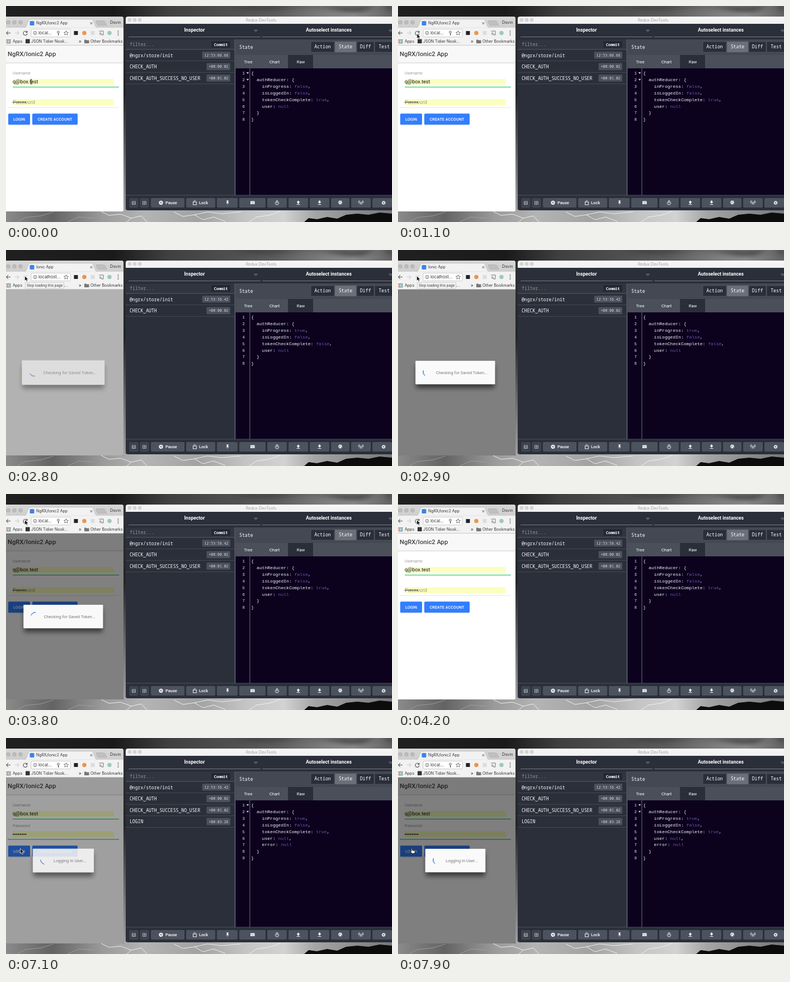
An HTML page for the animation above (8 s loop, 690 by 388 pixels).

```html
<!DOCTYPE html>
<html lang="en">
<head>
<meta charset="utf-8">
<title>Login state demo</title>
<style>
html,body{margin:0;width:100%;height:100%;overflow:hidden;background:#333}
svg{display:block;width:100vw;height:100vh}
text{white-space:pre}
.ui{font-family:Inter,"Open Sans",sans-serif}
.md{font-family:Roboto,sans-serif}
.mono{font-family:"Noto Sans Mono","DejaVu Sans Mono",monospace}
.code{font-family:"Liberation Mono","Courier New",monospace}
</style>
</head>
<body>
<svg id="stage" viewBox="0 0 690 388" preserveAspectRatio="none"></svg>
<script>
const LOOP = 8000;
const stage = document.getElementById('stage');

const rect = (x, y, w, h, fill, more = '') =>
  `<rect x="${x}" y="${y}" width="${w}" height="${h}" fill="${fill}" ${more}/>`;
const dot = (x, y, r, fill, more = '') => `<circle cx="${x}" cy="${y}" r="${r}" fill="${fill}" ${more}/>`;
const line = (d, stroke, w = 1, more = '') =>
  `<path d="${d}" fill="none" stroke="${stroke}" stroke-width="${w}" ${more}/>`;
const area = (d, fill, more = '') => `<path d="${d}" fill="${fill}" ${more}/>`;
const text = (x, y, s, size, fill, font = 'ui', more = '') =>
  `<text x="${x}" y="${y}" font-size="${size}" fill="${fill}" class="${font}" ${more}>${s}</text>`;
const group = (id, body, more = '') => `<g id="${id}" ${more}>${body}</g>`;
const grad = (id, stops, dir = '') =>
  `<linearGradient id="${id}" ${dir}>` + stops.map(([o, c]) =>
    `<stop offset="${o}" stop-color="${c}"/>`).join('') + '</linearGradient>';
const mid = 'text-anchor="middle"', end = 'text-anchor="end"';
const bold = 'font-weight="600"', medium = 'font-weight="500"';

function backdrop() {
  return '<defs>' +
    grad('sky', [[0, '#202020'], [.28, '#1a1a1a'], [.42, '#404040'], [.55, '#4c4c4c'],
      [.7, '#5c5c5c'], [.82, '#7c7c7c'], [.9, '#8c8c8c'], [1, '#626262']]) +
    grad('ground', [[0, '#8a8a8a'], [.12, '#636363'], [.25, '#9a9a9a'], [.36, '#b4b4b4'],
      [.5, '#a2a2a2'], [.62, '#c4c4c4'], [.72, '#d2d2d2'], [.8, '#a5a5a5'], [1, '#777']]) +
    grad('gap', [[0, '#333'], [.4, '#252525'], [.75, '#777'], [1, '#aaa']], 'x2="0" y2="1"') +
    grad('bar', [[0, '#d6d6d6'], [1, '#cfcfcf']], 'x2="0" y2="1"') +
    grad('pale', [[0, '#f8f8f8'], [1, '#efefef']], 'x2="0" y2="1"') +
    '<filter id="blur" x="-30%" y="-60%" width="160%" height="240%"><feGaussianBlur stdDeviation="4"/></filter>' +
    '</defs>' +
    rect(0, 0, 690, 388, 'url(#gap)') + rect(0, 0, 690, 20, 'url(#sky)') + rect(0, 366, 690, 22, 'url(#ground)') +
    area('M400 0Q450 9 500 4T590 7T650 5T690 9V0Z', '#2a2a2a', 'opacity=".7" filter="url(#blur)"') +
    line('M170 369L184 376L205 374L224 381L242 377L252 388M224 381L216 388M300 370L316 378L337 375L352 384L371 379L392 387M337 375L360 370L386 373L420 370M434 388L448 379L470 376L490 369', '#f4f4f4', .9) +
    line('M20 388L34 380L62 377L85 370M110 388L130 379L158 381', '#aaa', .7) +
    area('M533 388L541 381L556 383L574 379L592 382L608 375L628 373L648 375L668 371L690 373V388Z', '#0c0c0c');
}

function chrome() {
  let s = area('M0 19H206Q210 19 210 23V366Q210 369 207 369H0Z', '#fff') +
    area('M0 19H206Q210 19 210 23V39H0Z', 'url(#bar)') +
    rect(0, 39, 210, 31.5, '#f2f2f2') + rect(0, 70, 210, .8, '#bbb') +
    area('M33 39Q36 38 37 35L40 27Q41 24 44 24H152Q155 24 156 27L159 35Q160 38 163 39Z', '#f2f2f2', 'stroke="#b4b4b4" stroke-width=".5"') +
    rect(34, 38.5, 128, 1.2, '#f2f2f2') +
    area('M161 26.5H174Q176 26.5 177 28L180 35H166Q164 35 163 33Z', '#c0bfc0', 'stroke="#a8a8a8" stroke-width=".5"') +
    [4, 15, 26].map(x => dot(x, 29.5, 3.3, '#bdbdbd', 'stroke="#a0a0a0" stroke-width=".6"')).join('') +
    line('M150.5 29L154.5 33M154.5 29L150.5 33', '#555', .9) +
    text(186, 31.8, 'Dovin', 7.2, '#333');
  s += line('M8 48.5H1M4 45L.8 48.5L4 52', '#555', 1.1) + line('M16 48.5H23M20 45L23 48.5L20 52', '#ccc', 1.1) +
    rect(45, 41.5, 70, 14, '#fff', 'rx="2" stroke="#bbb" stroke-width=".7"') +
    dot(52, 48.5, 3, 'none', 'stroke="#555" stroke-width=".8"') + rect(51.6, 48, .9, 2.2, '#555') + rect(51.6, 46.6, .9, .8, '#555') +
    area('M107.5 44.4L108.6 47.2L111.6 47.4L109.3 49.3L110.1 52.2L107.5 50.6L104.9 52.2L105.7 49.3L103.4 47.4L106.4 47.2Z', 'none', 'stroke="#555" stroke-width=".8"') +
    rect(121.5, 45, 7, 7, '#222') + dot(140, 48.5, 3.8, '#ef9446') + rect(151.5, 45, 7, 7, '#dcdcdc') +
    line('M167 46V45H174V52H171M167 48Q171 48 171 52M167 50Q169 50 169 52', '#666', .9) +
    dot(185, 48.5, 3.7, '#9fc9b1') + [45, 48.5, 52].map(y => dot(200.5, y, .9, '#555')).join('');
  const hues = ['#d9534f', '#e0a33a', '#4a9b57', '#4a7fd0'];
  for (let i = 0; i < 9; i++) s += rect(1 + i % 3 * 2.7, 60 + (i / 3 | 0) * 2.7, 2, 2, hues[(i * 3 + (i / 3 | 0)) % 4]);
  return s + text(12, 66, 'Apps', 7, '#333') + rect(35, 59.5, 7.5, 7.5, '#333') +
    text(45, 66, 'JSON Tidier Nook...', 7, '#333') + text(130, 66, '»', 8, '#333') +
    area('M140 60.5H143L144 61.5H148.5V67H140Z', '#777') + text(151, 66, 'Other Bookmarks', 7, '#333') +
    group('favicon', rect(42.5, 27, 8, 8, '#3f83e8', 'rx="1.5"')) +
    group('tabSpin', line('M0 -3A3 3 0 0 0 -2 2.2', '#3878d8', 1.2)) +
    group('titleApp', text(54, 33.3, 'NgRX/Ionic2 App', 6.9, '#333')) +
    group('titleNew', text(54, 33.3, 'Ionic App', 6.9, '#333')) +
    group('urlShort', text(58, 51.3, 'local...', 7.7, '#333') +
      dot(93.5, 46.8, 1.8, 'none', 'stroke="#555"') + line('M93.5 48.5V53M93.5 51.5H95', '#555')) +
    group('urlLong', text(58, 51.3, 'localhost...', 7.7, '#333')) +
    group('reload', line('M37.2 46.6A3.6 3.6 0 1 0 38 49.4', '#555', 1.1) + area('M38.4 44.2V48H34.8Z', '#555')) +
    group('stop', line('M31 45.5L37 51.5M37 45.5L31 51.5', '#555', 1.1)) +
    group('tip', rect(34.5, 58.5, 69, 10.5, '#f4f4f4', 'stroke="#bbb" stroke-width=".6"') + text(37, 66, 'Stop loading this page', 6.1, '#333'));
}

const masked = (x, y, gap, r) => Array.from({length: 8}, (_, i) => dot(x + i * gap, y, r, '#222')).join('');

function form() {
  const button = (x, w, s) => rect(x, 194.5, w, 20, '#000', 'rx="1.5" opacity=".13"') +
    rect(x, 193.3, w, 19.7, '#327eff', 'rx="1.5"') + text(x + w / 2, 206, s, 7.3, '#fff', 'md', mid + ' ' + medium);
  return rect(0, 71, 210, 31, '#f8f8f8') + rect(0, 101.5, 210, 1, '#cfcfcf') + rect(0, 102.5, 210, 1, '#ededed') +
    text(3, 90, 'NgRX/Ionic2 App', 11.2, '#424242', 'md', medium) +
    text(12, 123, 'Username', 7, '#999', 'md') +
    rect(12, 131, 181, 10, '#faffbd') + text(12, 139.3, 'q@box.test', 9, '#111', 'md') +
    rect(12, 145, 190, 1.2, '#32c864') + rect(12, 167.5, 181, 10.5, '#faffbd') +
    group('idle', text(12, 176, 'Password', 9, '#999', 'md') + masked(13, 172.8, 3.1, .95) + rect(4, 182, 198, .7, '#ddd')) +
    group('filled', text(12, 159.5, 'Password', 7, '#999', 'md') + masked(13.2, 173, 3.15, 1.15) + rect(3, 181.5, 199, 1.2, '#32c864')) +
    button(4, 39, 'LOGIN') + button(47, 81, 'CREATE ACCOUNT');
}

const dialog = (id, x, w, label) => group(id,
  rect(x + 1, 207, w - 2, 41, '#000', 'opacity=".55" filter="url(#blur)"') +
  rect(x, 199, w, 42.3, '#fafafa', 'rx="1"') +
  `<g class="arc">${area('M-4.9 -5A7 7 0 0 0 -4.9 5Q-8 0 -4.9 -5Z', '#4a86e8', 'stroke="#4a86e8" stroke-width=".8"')}</g>` +
  text(x + 36.6, 223, label, 7.5, '#777', 'md'));

function devtools() {
  const title = (x, s) => text(x, 46.4, s, 8.7, '#fff', 'md', mid + ' ' + bold);
  let s = area('M214 23Q214 19 218 19H690V367H218Q214 367 214 364Z', '#2a2f3a') +
    area('M214 32V23Q214 19 218 19H690V32Z', 'url(#pale)') +
    [221, 230, 239].map(x => dot(x, 25, 3, '#d6d6d6', 'stroke="#bcbcbc" stroke-width=".5"')).join('') +
    text(456, 27.8, 'Redux DevTools', 7.2, '#a2a2a2', 'ui', mid) +
    title(337, 'Inspector') + title(577, 'Autoselect instances') +
    area('M442 42.5H451L446.5 47Z', '#555c69') + area('M683 42.5H692L687.5 47Z', '#555c69') +
    rect(219, 55, 236, 1, '#747a85') + rect(458, 55, 232, 1, '#747a85') +
    rect(214, 61, 195, 17, '#30353f') + text(221, 72, 'filter...', 8.2, '#8d929b', 'mono') +
    rect(214, 77.5, 195, .9, '#5a606b') + rect(408.5, 60, 2, 280, '#555b66');
  s += rect(410.5, 60, 280, 28, '#434853') + text(417, 76.5, 'State', 8.2, '#fff', 'mono');
  [['Action', 545, 42], ['State', 588, 38], ['Diff', 627, 31], ['Test', 659, 34]].forEach(([n, x, w]) => {
    s += rect(x, 64, w, 19, n == 'State' ? '#6a6f79' : '#292e39', 'stroke="#5c626d" stroke-width=".6"') +
      text(x + w / 2, 76.2, n, 8.2, '#fff', 'mono', mid);
  });
  s += rect(410.5, 88, 280, 24, '#4a4f5a') + rect(504, 88, 45, 24, '#2a2e39') + rect(410.5, 112, 280, 228, '#0c021e');
  [['Tree', 433], ['Chart', 480], ['Raw', 527]].forEach(([n, x]) => s += text(x, 103, n, 7.6, '#fff', 'md', mid));
  s += rect(435.5, 112, .8, 228, '#8b8799') + rect(214, 339.5, 476, .8, '#545a65');
  return s + '<g id="log"></g><g id="tree"></g>' +
    group('folds', area('M429.7 119H434.3L432 122ZM429.7 130.9H434.3L432 133.9Z', '#d0d0d8')) + toolbar();
}

function toolbar() {
  const w = '#fff';
  let s = '';
  [[221, 15], [240, 15]].forEach(([x, n], i) => {
    s += rect(x, 346, n, 15.5, '#3c424d', 'rx="1.5" stroke="#5a606b" stroke-width=".6"') +
      rect(x + 4.5, 351, 6, 5.5, 'none', 'stroke="#ccc" stroke-width=".7"') +
      line(i ? `M${x + 7.5} 351V356.5M${x + 4.5} 353.7H${x + 10}` : `M${x + 4.5} 353H${x + 10}M${x + 4.5} 355H${x + 10}`, '#ccc', .7);
  });
  [[259, 60], [322, 52], [377, 37], [417, 47], [467, 35], [505, 35], [543, 35], [581, 33], [617, 35], [655, 35]]
    .forEach(([x, n]) => s += rect(x, 345, n, 17, '#4c525e', 'rx="2"'));
  s += dot(277, 353.3, 3.6, w) + rect(275.5, 351.5, 1, 3.6, '#4c525e') + rect(277.5, 351.5, 1, 3.6, '#4c525e') +
    text(285, 356, 'Pause', 7.5, w, 'md', medium) +
    rect(334.5, 352, 6, 5, 'none', `stroke="${w}" stroke-width=".9"`) + line('M336 352V350.5A1.6 1.6 0 0 1 339 350.5', w, .9) +
    text(345, 356, 'Lock', 7.5, w, 'md', medium) +
    area('M393.8 349.5H398.2V350.3H397.3V352.8L398.6 354.2H396.3V357L396 357.5L395.7 357V354.2H393.4L394.7 352.8V350.3H393.8Z', w) +
    rect(437, 350.5, 7.5, 5.5, w, 'rx=".6"') + line('M438 352H443.5M438 353.4H443.5', '#4c525e', .7, 'stroke-dasharray=".8 .7"') + line('M439 354.9H442.5', '#4c525e', .6) +
    dot(484.5, 354, 3, 'none', `stroke="${w}" stroke-width=".9"`) + line('M483 349.8H486M484.5 352V354.4', w, .9) +
    area('M522.5 349.5L525.5 352.7H523.7V355H521.3V352.7H519.5Z', w) + rect(519.5, 356, 6, .9, w) +
    area('M560.5 355L563.5 351.8H561.7V349.5H559.3V351.8H557.5Z', w) + rect(557.5, 356, 6, .9, w) +
    rect(595, 349.8, 5, 1.2, w) + rect(594, 351.4, 7, 3.4, w, 'rx=".8"') + rect(595.2, 353.4, 4.6, 3.1, w, 'stroke="#4c525e" stroke-width=".6"') +
    line('M634.5 352L632.9 357M634.5 352L636.1 357M632.6 350.3A2.6 2.6 0 0 0 632.6 353.7M636.4 350.3A2.6 2.6 0 0 1 636.4 353.7M631.3 349.3A4.2 4.2 0 0 0 631.3 354.7M637.7 349.3A4.2 4.2 0 0 1 637.7 354.7', w, .8) +
    dot(675, 353.5, 2, 'none', `stroke="${w}" stroke-width="1.4"`) + dot(675, 353.5, 3.1, 'none', `stroke="${w}" stroke-width="1" stroke-dasharray="1.2 1.235"`);
  return s;
}

function logRows(rows, commit) {
  let s = commit ? rect(366.3, 62.3, 35.5, 13.3, '#232833', 'rx="1.5" stroke="#424853" stroke-width=".6"') +
    text(384, 71.6, 'Commit', 6.8, '#fff', 'mono', mid + ' ' + bold) : '';
  rows.forEach(([name, time], i) => {
    const y = 78 + i * 20.6, w = time.length * 3.9 + 7.5;
    s += text(221, y + 13.5, name, 8.1, '#fff', 'mono') + rect(401 - w, y + 4, w, 12.6, '#4a505c', 'rx="1.5"') +
      text(397.5, y + 12.7, time, 6.5, '#d5d8dd', 'mono', end) + rect(214, y + 20.2, 195, .8, '#4a505b');
  });
  return s;
}

function treeLines(name, fields) {
  const lines = ['{', `  ${name}: {`, ...fields.map((f, i) => '    ' + f + (i < fields.length - 1 ? ',' : '')), '  }', '}'];
  return lines.map((l, i) => {
    const y = 123 + i * 11.9;
    const body = l.replace(/(true|false|null)/, '<tspan fill="#6f55b5">$1</tspan>');
    return text(427, y, i + 1, 7.3, '#e4e4ea', 'code', end) + text(438.3, y, body, 8.05, '#f4f4f8', 'code', 'xml:space="preserve"');
  }).join('');
}

const check = ['CHECK_AUTH', '+00:00.02'], noUser = ['CHECK_AUTH_SUCCESS_NO_USER', '+00:01.02'];
const init = time => ['@ngrx/store/init', time];
const reducer = (busy, done, ...more) => treeLines('authReducer',
  [`inProgress: ${busy}`, 'isLoggedIn: false', `tokenCheckComplete: ${done}`, 'user: null', ...more]);
const start = '12:53:58.42';
const steps = [
  [0, logRows([init('12:53:08.66'), check, noUser], true), reducer(false, true)],
  [1900, logRows([init('9:05:03.26')], false), treeLines('auth', ['username: null', 'isLoggedIn: false'])],
  [2750, logRows([init(start), check], true), reducer(true, false)],
  [3780, logRows([init(start), check, noUser], true), reducer(false, true)],
  [7000, logRows([init(start), check, noUser, ['LOGIN', '+00:03.28']], true), reducer(true, true, 'error: null')]
];

const pointer = group('beam', line('M-1.5 -4.5Q0 -4.5 0 -3V3Q0 4.5 -1.5 4.5M1.5 -4.5Q0 -4.5 0 -3M0 3Q0 4.5 1.5 4.5', '#222', .9)) +
  group('arrow', area('M0 0V9L2.1 7.1L3.6 10.3L5.1 9.6L3.7 6.5H6.4Z', '#111', 'stroke="#fff" stroke-width=".7"')) +
  group('hand', area('M-1.6 .6Q-1.6 -.4 -.7 -.4T.2 .6V3.2L4 4Q5 4.3 4.9 5.4L4.2 9H-.4L-3.4 5.6Q-3 4.4 -1.6 5.3Z', '#fff', 'stroke="#111" stroke-width=".9"'));

stage.innerHTML = backdrop() + devtools() + chrome() + group('form', form()) +
  rect(0, 71, 210, 298, '#000', 'id="shade"') +
  dialog('checking', 31.2, 142.3, 'Checking for Saved Token...') + dialog('logging', 48.7, 107.6, 'Logging In User...') +
  group('pointer', pointer);

const el = {};
stage.querySelectorAll('[id]').forEach(n => el[n.id] = n);
const show = (id, on) => el[id].setAttribute('display', on ? 'inline' : 'none');
const ramp = (t, a, b) => Math.max(0, Math.min(1, (t - a) / (b - a)));
const ease = p => p * p * (3 - 2 * p);
const within = (t, a, b) => t >= a && t < b;

function popup(id, cx, spinX, amount, scale, turn) {
  show(id, amount > 0);
  el[id].setAttribute('opacity', amount);
  el[id].setAttribute('transform', `translate(${cx} 220) scale(${scale}) translate(${-cx} -220)`);
  el[id].querySelector('.arc').setAttribute('transform', `translate(${spinX} 219.5) rotate(${turn})`);
}

let current = -1;
function draw(t) {
  let k = 0;
  steps.forEach((s, i) => { if (t >= s[0]) k = i; });
  if (k !== current) {
    current = k;
    el.log.innerHTML = steps[k][1];
    el.tree.innerHTML = steps[k][2];
  }
  show('folds', !within(t, 2750, 4700));

  const loading = within(t, 1700, 2700), fresh = within(t, 1700, 3780);
  show('favicon', !loading);
  show('tabSpin', loading);
  el.tabSpin.setAttribute('transform', `translate(46.5 31) rotate(${(t - 2200) * .36})`);
  show('titleNew', fresh);
  show('titleApp', !fresh);
  show('urlLong', fresh);
  show('urlShort', !fresh);
  show('stop', loading);
  show('reload', !loading);
  el.reload.setAttribute('opacity', within(t, 2700, 3780) ? .12 : 1);
  show('tip', within(t, 2700, 3600));

  show('form', !within(t, 2600, 3780));
  show('idle', t < 6900);
  show('filled', t >= 6900);
  const checkIn = ramp(t, 2680, 2880), checkOut = ramp(t, 3800, 4000);
  const login = ramp(t, 6950, 7150);
  const a = checkIn * (1 - checkOut);
  el.shade.setAttribute('opacity', .5 * Math.max(a, login));
  popup('checking', 102.5, 51.7, a, 1.1 - .1 * checkIn - .1 * checkOut, (t - 2900) * .48 - 16);
  popup('logging', 102.5, 69.5, ease(login), 1.1 - .1 * ease(login), (t - 7900) * .48 - 16);

  const up = ease(ramp(t, 300, 1200)), down = ease(ramp(t, 4700, 5500));
  const x = 45 - 11.5 * up - 8 * down, y = 136 - 89.5 * up + 152 * down;
  el.pointer.setAttribute('transform', `translate(${x} ${y})`);
  const beam = within(y, 131, 142) || within(y, 167, 178);
  const hand = y > 193 && !within(t, 7020, 7300);
  show('beam', beam);
  show('hand', hand);
  show('arrow', !beam && !hand);
}

const t0 = performance.now();
function frame() {
  draw((performance.now() - t0) % LOOP);
  requestAnimationFrame(frame);
}
frame();
</script>
</body>
</html>
```
